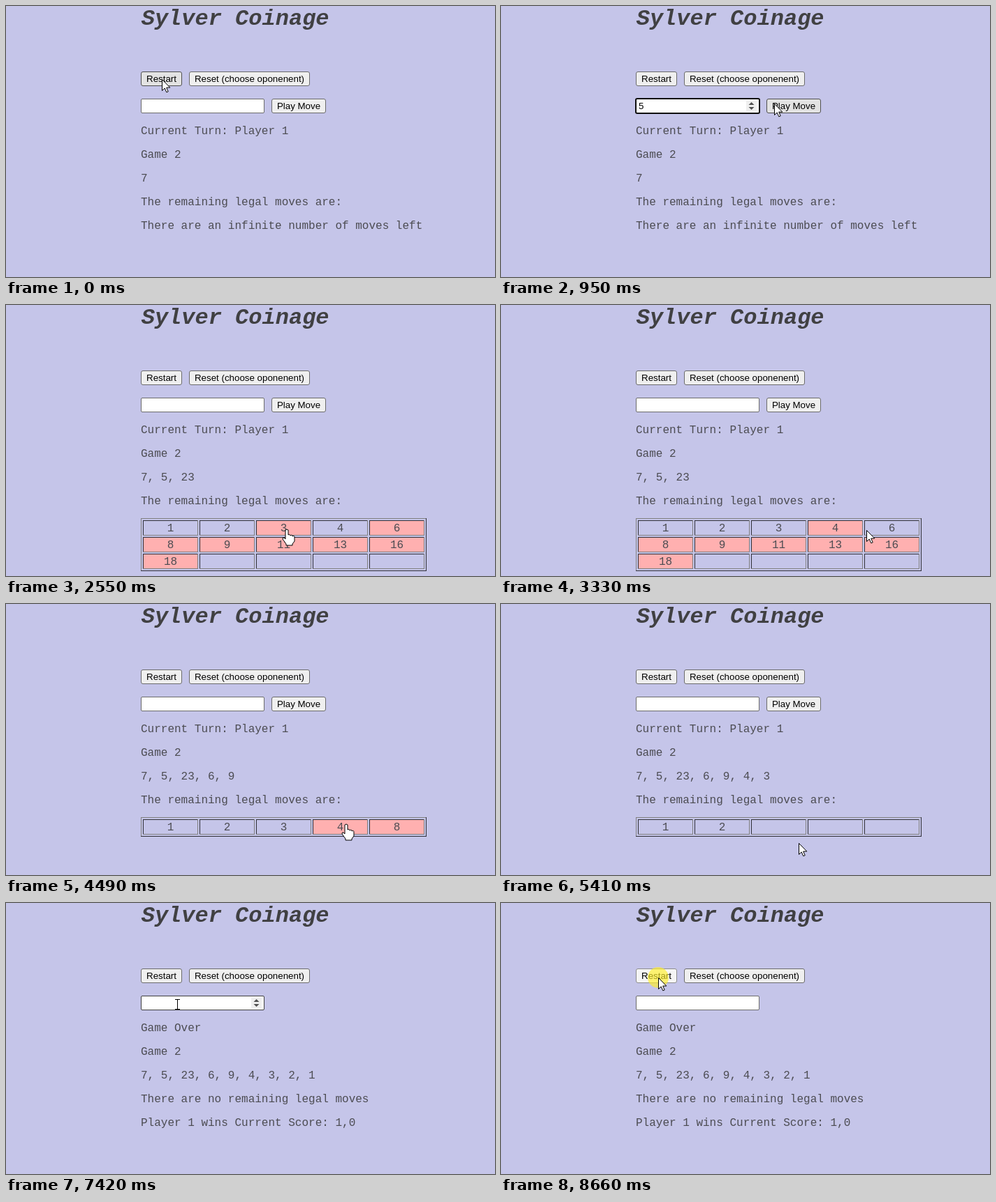
These frames come from a looping animation (700 px wide and 389 px high, 8810 ms). An HTML page with a canvas:

```html
<!DOCTYPE html>
<html lang="en">
<head>
<meta charset="utf-8">
<title>Sylver Coinage</title>
<style>
  html, body { margin: 0; width: 100%; height: 100%; overflow: hidden; background: #c5c5e9; }
  canvas { display: block; width: 700px; height: 389px; }
</style>
</head>
<body>
<canvas id="stage" width="700" height="389"></canvas>
<script>
const ctx = document.getElementById('stage').getContext('2d', { alpha: false });
const LOOP = 8810, STEP = 76, CLICK = 80;
const MONO = '"Liberation Mono", "Courier New", monospace';
const SANS = '"Liberation Sans", Arial, sans-serif';
const INK = '#4c4c52', PINK = '#ffb0b0';
const LIGHT_EDGE = '#808080', DARK_EDGE = '#303038';

// Layout
const LEFT = 193, LINE = 34;
const RESTART = { x: LEFT, y: 94, w: 59, h: 21 };
const RESET = { x: 262, y: 94, w: 173, h: 21 };
const FIELD = { x: LEFT, y: 133, w: 177, h: 21 };
const PLAY = { x: 380, y: 133, w: 78, h: 21 };
const TABLE_Y = 306, COLS = 5, CELL_W = 79, CELL_H = 22, GAP = 2;
const cellX = col => LEFT + 3 + col * (CELL_W + GAP);
const cellY = row => TABLE_Y + 3 + row * (CELL_H + GAP);
const inCell = (col, dx, dy) => [cellX(col) + dx, cellY(0) + dy];
const inBox = (box, dx, dy) => [box.x + dx, box.y + dy];

// Story: each turn adds the player's number and the reply to it
const MOVES = [7, 5, 23, 6, 9, 4, 3, 2, 1];
const FOCUS = 550, TYPED = 780, FIRST_TURN = 1400, GAME_OVER = 6330, FINAL_CLICK = 8660;
const TURNS = [FIRST_TURN, 3950, 4950, GAME_OVER];

const START = inBox(RESTART, 30, 11);
const ROUTE = [
  { from: 70, steps: 5, to: inBox(FIELD, 69, 12) },
  { from: 780, steps: 3, to: inBox(PLAY, 11, 7) },
  { from: 1860, steps: 1, to: inBox(PLAY, 45, 34) },
  { from: 1940, steps: 9, to: inCell(2, 44, 13) },
  { from: 2720, steps: 5, to: inCell(3, 69, 17) },
  { from: 3330, steps: 3, to: inCell(4, 33, 9) },
  { from: 4180, steps: 5, to: inCell(3, 48, 7) },
  { from: 5330, steps: 3, to: inCell(2, 37, 47) },
  { from: 5560, steps: 4, to: inCell(1, 42, 15) },
  { from: 6640, steps: 4, to: inBox(FIELD, 83, 35) },
  { from: 7020, steps: 6, to: inBox(FIELD, 52, 11) },
  { from: 7500, steps: 6, to: inBox(RESTART, 32, 16) },
  { from: 7960, steps: 1, to: inBox(RESTART, 32, 13) }
];

const ARROW = new Path2D('M.5.5V16.5L4.2 13 6.8 18.8 9.2 17.8 6.7 12.1H11.8Z');
const HAND = new Path2D('M-2 1Q0-1 2 1V8Q4 6 5 9Q8 7 8 10Q11 8 11 12V17L8 21V23H-1V21L-6 14Q-6 11-4 12L-2 14Z');

function pointerAt(t) {
  let at = START;
  for (const { from, steps, to } of ROUTE) {
    if (t < from) break;
    const p = Math.min(1, (Math.floor((t - from) / STEP) + 1) / steps);
    at = at.map((v, i) => Math.round(v + (to[i] - v) * p));
  }
  return at;
}

// Numbers that are not sums of the numbers already played
function legalMoves(played) {
  const reach = [true];
  const legal = [];
  for (let n = 1; n <= 30; n++) {
    reach[n] = played.some(m => m <= n && reach[n - m]);
    if (!reach[n]) legal.push(n);
  }
  return legal;
}

const within = ([px, py], { x, y, w, h }) => px >= x && px < x + w && py >= y && py < y + h;

// A cell stays hovered until the pointer is well inside the next one
function cellAt([x, y], rows) {
  const col = Math.floor((x - cellX(0) - 4) / (CELL_W + GAP));
  const row = Math.floor((y - cellY(0)) / (CELL_H + GAP));
  const inside = col >= 0 && col < COLS && row >= 0 && row < rows && y <= cellY(row) + CELL_H;
  return inside ? row * COLS + col : -1;
}

function text(str, x, y, font, color = INK, align = 'left') {
  ctx.font = font;
  ctx.fillStyle = color;
  ctx.textAlign = align;
  ctx.fillText(str, x, y);
}

function frame({ x, y, w, h }, radius, fill, stroke, line = 1) {
  ctx.beginPath();
  ctx.roundRect(x + line / 2, y + line / 2, w - line, h - line, radius);
  ctx.fillStyle = fill;
  ctx.fill();
  ctx.lineWidth = line;
  ctx.strokeStyle = stroke;
  ctx.stroke();
}

function button(label, box, pointer, pressed) {
  let fill = '#efefef', edge = '#6b6b6b';
  if (within(pointer, box)) [fill, edge] = pressed ? ['#f5f5f5', '#8d8d8d'] : ['#e3e3e3', '#4f4f4f'];
  frame(box, 2.5, fill, edge);
  text(label, box.x + box.w / 2, box.y + 15, '13.333px ' + SANS, '#000', 'center');
}

function bevel(x, y, w, h, topLeft, bottomRight) {
  ctx.fillStyle = bottomRight;
  ctx.fillRect(x, y + h - 1, w, 1);
  ctx.fillRect(x + w - 1, y, 1, h);
  ctx.fillStyle = topLeft;
  ctx.fillRect(x, y, w - 1, 1);
  ctx.fillRect(x, y, 1, h - 1);
}

function table(legal, hovered, played) {
  const rows = Math.ceil(legal.length / COLS);
  const kept = hovered ? legalMoves([...played, hovered]) : legal;
  bevel(LEFT, TABLE_Y, cellX(COLS) + 1 - LEFT, cellY(rows) + 1 - TABLE_Y, LIGHT_EDGE, DARK_EDGE);
  for (let i = 0; i < rows * COLS; i++) {
    const x = cellX(i % COLS), y = cellY(Math.floor(i / COLS)), n = legal[i];
    if (n && !kept.includes(n)) {
      ctx.fillStyle = PINK;
      ctx.fillRect(x, y, CELL_W, CELL_H);
    }
    bevel(x, y, CELL_W, CELL_H, DARK_EDGE, LIGHT_EDGE);
    if (n) text(n, x + CELL_W / 2, y + 16, '16px ' + MONO, INK, 'center');
  }
}

function triangle(x, y, dir) {
  ctx.beginPath();
  ctx.moveTo(x - 4, y);
  ctx.lineTo(x + 4, y);
  ctx.lineTo(x, y + dir * 4);
  ctx.fill();
}

function numberField(t, pointer) {
  const focused = t >= FOCUS && t < FIRST_TURN - CLICK;
  const hovered = within(pointer, FIELD);
  const { x, y, w, h } = FIELD;
  if (focused) frame({ x: x - 1, y: y - 1, w: w + 2, h: h + 2 }, 2, '#fff', '#101010', 2);
  else frame(FIELD, 1.5, '#fff', hovered ? '#404040' : '#6b6b6b');
  if (t >= TYPED && t < FIRST_TURN) text('5', x + 4, y + 15, '13.333px ' + SANS, '#000');
  if (focused || hovered) {
    ctx.fillStyle = '#efefef';
    ctx.fillRect(x + w - 19, y + 3, 15, 15);
    ctx.fillStyle = '#505050';
    triangle(x + w - 11.5, y + 9, -1);
    triangle(x + w - 11.5, y + 12, 1);
  }
}

function drawPointer([x, y], kind) {
  ctx.save();
  ctx.translate(x, y);
  ctx.lineWidth = 1;
  ctx.strokeStyle = '#000';
  ctx.fillStyle = '#fff';
  if (kind === 'beam') {
    ctx.fillStyle = '#000';
    ctx.fillRect(0, -6, 1, 15);
    for (const end of [-6, 8]) {
      ctx.fillRect(-3, end, 3, 1);
      ctx.fillRect(1, end, 3, 1);
    }
  } else {
    const shape = kind === 'hand' ? HAND : ARROW;
    ctx.fill(shape);
    ctx.stroke(shape);
  }
  ctx.restore();
}

function draw(t) {
  const pointer = pointerAt(t);
  const played = MOVES.slice(0, 1 + 2 * TURNS.filter(turn => turn <= t).length);
  const over = t >= GAME_OVER;
  const pressed = t >= FINAL_CLICK || [FIRST_TURN, GAME_OVER].some(turn => t >= turn - CLICK && t < turn);
  const endless = played.length < 2;
  const legal = endless || over ? [] : legalMoves(played);
  const cell = cellAt(pointer, Math.ceil(legal.length / COLS));

  ctx.fillStyle = '#c5c5e9';
  ctx.fillRect(0, 0, 700, 389);
  text('Sylver Coinage', LEFT + 0.7, 27, 'italic bold 32px ' + MONO, '#404042');

  button('Restart', RESTART, pointer, pressed);
  button('Reset (choose oponenent)', RESET, pointer, pressed);
  numberField(t, pointer);
  if (!over) button('Play Move', PLAY, pointer, pressed);

  const lines = [
    over ? 'Game Over' : 'Current Turn: Player 1',
    'Game 2',
    played.join(', '),
    over ? 'There are no remaining legal moves' : 'The remaining legal moves are:'
  ];
  if (over) lines.push('Player 1 wins Current Score: 1,0');
  if (endless) lines.push('There are an infinite number of moves left');
  lines.forEach((line, i) => text(line, LEFT, 184 + LINE * i, '16px ' + MONO));
  if (legal.length) table(legal, legal[cell], played);

  if (pressed) {
    ctx.beginPath();
    ctx.arc(...pointer, 15, 0, 2 * Math.PI);
    ctx.fillStyle = 'rgba(255, 238, 40, 0.65)';
    ctx.fill();
  }

  const onText = lines.some((line, i) =>
    within(pointer, { x: LEFT, y: 171 + LINE * i, w: line.length * 9.6, h: 17 }));
  const onGap = (pointer[0] - cellX(0)) % (CELL_W + GAP) === 3;
  const onInput = within(pointer, { ...FIELD, w: FIELD.w - 20 });
  let kind = 'arrow';
  if (legal[cell]) kind = onGap ? 'arrow' : 'hand';
  else if (cell >= 0 || onText || onInput) kind = 'beam';
  drawPointer(pointer, kind);
}

function tick() {
  draw(performance.now() % LOOP);
  requestAnimationFrame(tick);
}
tick();
</script>
</body>
</html>
```
